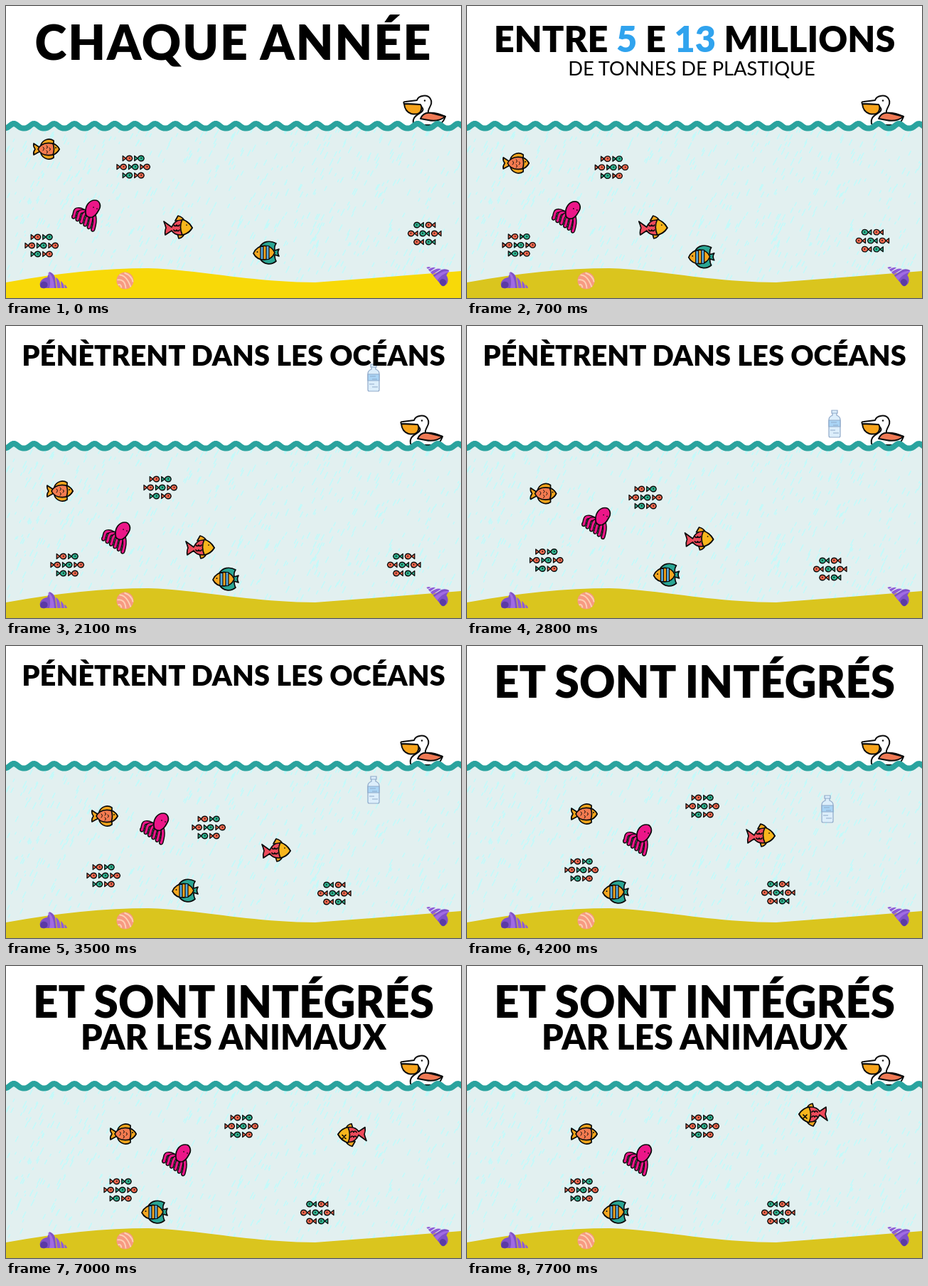
These frames come from a looping animation (640 by 412 pixels, 8 s). An HTML page:

```html
<!DOCTYPE html>
<html lang="fr">
<head>
<meta charset="utf-8">
<style>
html, body { margin: 0; width: 100%; height: 100%; overflow: hidden; background: #fff; }
svg { display: block; width: 640px; height: 412px; }
text { font-family: Lato, "Open Sans", sans-serif; font-weight: 900; text-anchor: middle; }
.ink { stroke: #0b0b0b; stroke-width: 1.7; stroke-linejoin: round; stroke-linecap: round; }
.line { fill: none; }
</style>
</head>
<body>
<svg viewBox="0 0 640 412">
<defs>
  <g id="minnow" class="ink" style="stroke-width:1.3">
    <path d="M-2 0L-6.500-3.500V3.500L-2 0C0-5 6-5 7 0C6 5 0 5-2 0Z"/>
    <circle cx="3" cy="-.3" r=".9" fill="#111" stroke="none"/>
  </g>
  <g id="school"></g>
  <g id="goldie" class="ink">
    <path fill="#f5a51d" d="M-8-6C-5-14 4-16 10-12L10-6ZM-8 6C-5 14 4 16 10 12L10 6ZM-9-2L-18-8Q-19-4-16 0Q-19 4-18 8L-9 3Z"/>
    <path fill="#f47b50" d="M-12 0C-7-11 12-12 18 0C12 12-7 11-12 0Z"/>
    <path fill="#f5a51d" d="M9-8Q15-6 18 0Q15 6 9 8Q12 0 9-8Z"/>
    <path class="line" stroke-width="1" d="M-5-3q3 2 0 5M0-5q3 2 0 4M0 2q3 2 0 4M4-2q3 2 0 4"/>
    <circle cx="13" cy="-2" r="1" fill="#111" stroke="none"/>
  </g>
  <g id="snapper" class="ink">
    <path fill="#f5a51d" d="M-4-9L0-16Q7-14 9-9ZM-1 9L1 16Q7 15 9 9Z"/>
    <path fill="#ee4b5c" d="M-9 0L-20-8Q-18-3-17 1Q-19 6-18 11L-9 5C-3 14 13 13 20 1C13-13-3-14-9 0Z"/>
    <path fill="#f8b61c" d="M6-11Q15-8 20 1Q15 9 6 11Q1 0 6-11Z"/>
    <path class="line" d="M-6-3q2 3 4 0q2 3 4 0M-6 4q2 3 4 0q2 3 4 0"/>
    <path class="line" id="eye" d="M12-3h.1"/>
  </g>
  <g id="angel" class="ink">
    <path fill="#2ba694" d="M-9-8C-5-16 5-18 14-13Q11-9 12-3L18-5Q15 0 18 5L12 3Q12 9 14 12C7 18-4 17-9 8Z"/>
    <path fill="#f5a720" d="M-18 1C-12-13 7-13 12 0C7 13-12 13-18 1Z"/>
    <path fill="#58a9dc" d="M-8-8.500h4v18h-4ZM0-9.500h4v19h-4Z" stroke-width="1.2"/>
    <circle cx="-12.500" cy="-1" r="1" fill="#111" stroke="none"/>
  </g>
  <g id="octopus" class="ink">
    <g id="arms"></g>
    <path fill="#ec1688" d="M-1-3C-2-13 4-21 12-21C19-21 21-13 18-8C15-3 14 1 8 3C4 4-1 2-1-3Z"/>
    <path class="line" d="M10-11h.1M15-9h.1"/>
  </g>
  <g id="bottle" stroke="#8fa9c9" stroke-width="1.2" fill="#dceefb">
    <path d="M-4-19H4V-15H-4ZM-3-15H3V-12Q8-10 8-6V17Q8 19 6 19H-6Q-8 19-8 17V-6Q-8-10-3-12Z"/>
    <path fill="#a9d4f5" d="M-8-5H8V4H-8Z"/>
    <path class="line" d="M-6 9H1M-2 13H6M-5-2H3M-2 2H5"/>
  </g>
  <g id="shell">
    <path fill="#7f51c8" d="M-19 8C-21 1-14-4-9-4L-6-12Q0-10 2-4L4 11H-12Q-18 12-19 8Z"/>
    <path fill="#a06be3" d="M-8-11Q0-8 1 11H-6Q-3 0-8-11Z"/>
    <path fill="#5b3aa5" d="M-19 8C-19 1-12 0-9 4Q-7 9-12 11Q-18 12-19 8Z"/>
    <path fill="#8f5bd8" d="M3-4Q9-2 10 11H5ZM10 1Q14 3 15 11H11ZM15 6Q18 7 19 11H16Z"/>
  </g>
</defs>
<path id="water" fill="#e2f0f0"/>
<path id="flecks" fill="none" stroke="#c4fafa" stroke-width="1.600" stroke-linecap="round"/>
<path id="sand" d="M0 390Q110 370 200 370C270 372 340 389 435 390Q540 382 640 374V412H0Z"/>
<use href="#shell" transform="translate(67 387)"/>
<use href="#shell" transform="translate(611 376) rotate(50) scale(-.95 .95)"/>
<g transform="translate(167.500 387.500)">
  <circle r="12" fill="#f79a82"/>
  <path fill="none" stroke="#fbd0b4" stroke-width="2" d="M-8-8Q2-8 8 9M-11-1Q0-3 1 11M-1-11Q10-7 11 2M-10 6Q-6 4-5 10"/>
</g>
<g id="pelican" class="ink" style="stroke-width:2">
  <path fill="#fff" d="M569 166C567 155 577 153 581 149C585 145 580 142 577 139L556 138Q554 135 558 135L574 133C576 126 589 124 593 131C598 139 588 145 590 151Q601 150 614 156Q611 165 604 168H571Z"/>
  <path fill="#f7a41c" d="M556 138L579 139Q582 143 579 149Q575 154 566 152Q557 149 556 138Z"/>
  <path fill="#f07a55" d="M579 159Q583 149 594 151L614 156Q604 164 590 161Z"/>
  <circle cx="585" cy="133.500" r="1.200" fill="#111" stroke="none"/>
</g>
<path id="wave" fill="none" stroke="#2aa39e" stroke-width="8"/>
<g id="cast"></g>
<g id="titles">
  <g><text x="320" y="76" font-size="68" letter-spacing="2">CHAQUE ANNÉE</text></g>
  <g><text x="320" y="65" font-size="50.400">ENTRE <tspan fill="#30a3ee">5</tspan> E <tspan fill="#30a3ee">13</tspan> MILLIONS</text>
    <text x="316" y="98" font-size="27.300" style="font-weight:400">DE TONNES DE PLASTIQUE</text></g>
  <g><text x="320" y="56" font-size="39.800">PÉNÈTRENT DANS LES OCÉANS</text></g>
  <g><text x="320" y="73" font-size="62">ET SONT INTÉGRÉS</text>
    <text id="second" x="320" y="118" font-size="48.200">PAR LES ANIMAUX</text></g>
</g>
</svg>
<script>
const STEP = 700, LOOP = 8000;
const $ = id => document.getElementById(id);
const set = (el, attrs) => { for (const k in attrs) el.setAttribute(k, attrs[k]); return el; };
const add = (parent, tag, attrs) => parent.appendChild(
  set(document.createElementNS('http://www.w3.org/2000/svg', tag), attrs));
const mix = (a, b, k) => a + (b - a) * k;
const clamp = k => Math.max(0, Math.min(1, k));

// Water surface: narrow crests, wide troughs
let crest = '';
for (let x = -4; x <= 644; x += 2) {
  const swell = (1 + Math.cos((x - 11) * 2 * Math.PI / 28.4)) / 2;
  crest += `${crest ? 'L' : 'M'}${x} ${(172.5 - 6.5 * swell ** 1.5).toFixed(1)}`;
}
set($('wave'), { d: crest });
set($('water'), { d: crest + 'V412H-4Z' });

// Short slanted glints in the water
let seed = 7;
const rand = () => (seed = seed * 16807 % 2147483647) / 2147483647;
let glints = '';
for (let i = 0; i < 700; i++) {
  const len = 2 + rand() * 7;
  glints += `M${rand() * 640} ${178 + rand() * 212}l${len * .5} ${-len}`;
}
set($('flecks'), { d: glints });

// Rows of two, three and two fish in alternating colours
let count = 0;
for (let row = -1; row <= 1; row++) {
  const n = 3 - Math.abs(row);
  for (let i = 0; i < n; i++)
    add($('school'), 'use', { href: '#minnow', x: (i - (n - 1) / 2) * 16.5, y: row * 12, fill: count++ % 2 ? '#2fb28f' : '#f0694f' });
}

// Arms fan out from the head towards the lower left
for (let i = 0; i < 6; i++) {
  const k = i / 5, x = mix(-18, 9, k), y = mix(2, 20, k);
  const d = `M${mix(3, 10, k)} -2Q${x + 4} ${y - 15} ${x + 2} ${y - 6}T${x} ${y}`;
  add($('arms'), 'path', { d, fill: 'none', 'stroke-width': 6 });
  add($('arms'), 'path', { d, fill: 'none', stroke: '#ec1688', 'stroke-width': 3.2 });
}

// Each swimmer passes its points at these steps
const STOPS = [0, 3, 5, 6];
const swimmers = [
  ['school', [179, 227], [217, 228], [285, 256], [331, 226]],
  ['school', [50, 338], [86, 337], [137, 324], [161, 316]],
  ['school', [589, 321], [560, 337], [462, 349], [438, 348]],
  ['goldie', [57, 202], [76, 233], [139, 240], [165, 237]],
  ['octopus', [113, 295], [155, 298], [209, 257], [240, 273]],
  ['angel', [366, 348], [309, 357], [252, 345], [209, 347]],
  ['snapper', [242, 312], [273, 312], [380, 288], [413, 267]]
].map(([name, ...path]) => ({ name, path, el: add($('cast'), 'use', { href: '#' + name }) }));
const bottle = add($('cast'), 'use', { href: '#bottle' });

function swim(path, step) {
  const leg = step < 3 ? 0 : step < 5 ? 1 : 2;
  let k = clamp((step - STOPS[leg]) / (STOPS[leg + 1] - STOPS[leg]));
  if (!leg) k = 1 - (1 - k) ** 2.5;
  return path[leg].map((v, i) => mix(v, path[leg + 1][i], k));
}

const move = (el, x, y, extra = '') => set(el, { transform: `translate(${x} ${y}) ${extra}` });
const show = (el, on) => { el.style.display = on ? '' : 'none'; };

function draw() {
  const step = Math.floor(performance.now() % LOOP / STEP);
  const dead = step >= 10;
  for (const { name, path, el } of swimmers) {
    let [x, y] = swim(path, step), turn = '';
    if (name === 'school' && path[0][0] > path[3][0]) turn = 'scale(-1 1)';
    if (name === 'snapper') {
      // chases the bottle, then floats up belly first
      x += 74 * clamp((step - 6) / 2);
      y -= 57 * clamp((step - 9) / 2);
      if (dead) turn = 'rotate(180)';
    }
    move(el, x, y, turn);
  }
  const sunk = step >= 6;
  move(bottle, sunk ? 507 : 517, sunk ? 230 + 14 * (step - 6) : 73 + 65 * (step - 3));
  show(bottle, step >= 2 && step <= 8);
  set($('eye'), { d: dead ? 'M9-5l5 5m0-5l-5 5' : 'M12-3h.1' });
  set($('sand'), { fill: step ? '#dac51e' : '#f8d908' });
  move($('pelican'), step ? 0 : 4, 0);
  const title = step < 2 ? step : sunk ? 3 : 2;
  [...$('titles').children].forEach((g, i) => show(g, i === title));
  show($('second'), step >= 7);
  requestAnimationFrame(draw);
}
draw();
</script>
</body>
</html>
```
